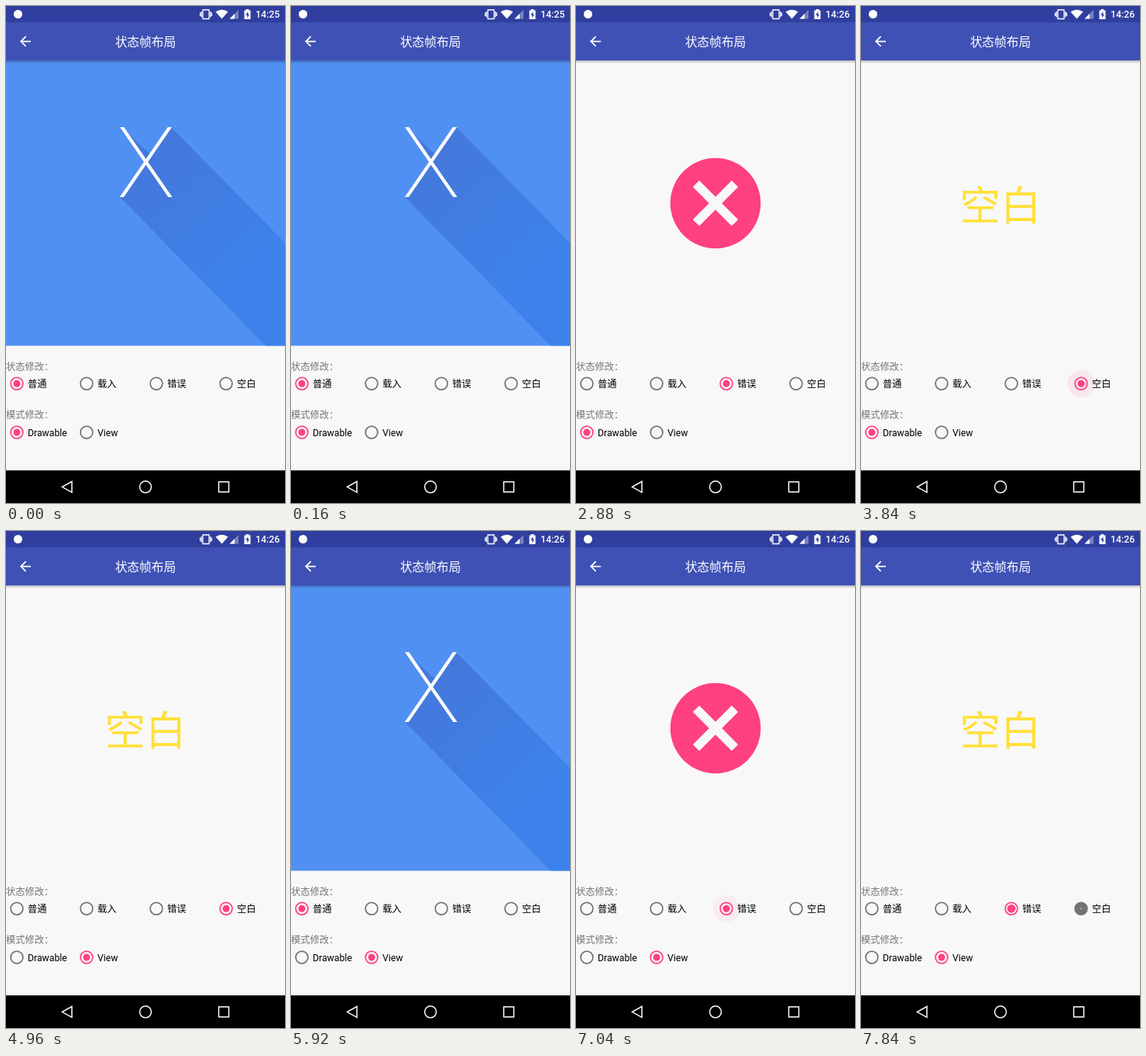
These frames come from a looping animation (360x640 px, 8 s). An HTML page:

```html
<!DOCTYPE html>
<html lang="zh-CN">
<head>
<meta charset="utf-8">
<title>状态帧布局</title>
<style>
  html, body { margin: 0; width: 100%; height: 100%; overflow: hidden; background: #f8f8f8; }
  svg { display: block; width: 100vw; height: 100vh; }
  text { font-family: Roboto, "Noto Sans CJK SC", "Noto Sans CJK", sans-serif; font-size: 12.25px; }
</style>
</head>
<body>
<svg id="stage" viewBox="0 0 360 640">
  <defs>
    <linearGradient id="long" gradientUnits="userSpaceOnUse" x1="180" y1="200" x2="320" y2="340">
      <stop offset="0" stop-color="#4478dc"/>
      <stop offset="1" stop-color="#3c82ea"/>
    </linearGradient>
    <linearGradient id="drop" x2="0" y2="1">
      <stop offset="0" stop-opacity=".26"/>
      <stop offset="1" stop-opacity="0"/>
    </linearGradient>
    <filter id="blur" x="-30%" y="-30%" width="160%" height="160%">
      <feGaussianBlur stdDeviation="1.3"/>
    </filter>
  </defs>
  <rect width="360" height="640" fill="#f8f8f8"/>

  <g id="normal">
    <rect y="70" width="360" height="367.5" fill="#5190f3"/>
    <path d="M150 157L187 192L213 156L360 305V437.5H335L147 246L180 201Z" fill="url(#long)"/>
    <path d="M147 156h5.2L214.5 246h-5.2ZM208.800 156h5.200L152 246h-5.200Z" fill="#fff"/>
  </g>
  <g id="load">
    <g id="disc">
      <circle cx="180" cy="255.300" r="17.500" opacity=".24" filter="url(#blur)"/>
      <circle cx="180" cy="254" r="17.500" fill="#fafafa"/>
    </g>
    <path id="arc" fill="none" stroke="#33aede" stroke-width="2.200"/>
  </g>
  <g id="error" transform="translate(180 254) scale(5.830)">
    <circle r="10" fill="#ff4081"/>
    <path d="M-4.295 -4.295L4.295 4.295M4.295 -4.295L-4.295 4.295" stroke="#f8f8f8" stroke-width="2"/>
  </g>
  <text id="empty" x="180" y="276" text-anchor="middle" fill="#ffe03a" style="font-size:52.5px">空白</text>

  <rect y="70" width="360" height="4" fill="url(#drop)"/>
  <rect width="360" height="70" fill="#3f51b5"/>
  <rect width="360" height="21" fill="#303f9f"/>
  <g fill="#fff">
    <circle cx="15.500" cy="10.500" r="5.500"/>
    <path d="M254 5h8v11.500h-8ZM252.300 7v7.500M250.600 8.500v4.500M263.700 7v7.500M265.400 8.500v4.500" fill="none" stroke="#fff" stroke-width="1.300"/>
    <path d="M270.500 7.500Q278.500 1.800 286.500 7.500L278.500 16.500Z"/>
    <path d="M300 5V16.500H288.500Z" opacity=".35"/>
    <path d="M295 10V16.500H288.500Z"/>
    <path d="M307.500 5.500h2.300V4h3.400v1.500h2.300V17h-8Z"/>
    <path d="M312.300 7L309.200 11.700h2V15.500L314 10.700h-1.700Z" fill="#303f9f"/>
    <text id="clock" x="322" y="15" font-weight="500"></text>
    <path transform="translate(14.500 35) scale(.875)" d="M20 11H7.830l5.590-5.590L12 4l-8 8 8 8 1.410-1.410L7.830 13H20z"/>
    <text x="180" y="51.500" text-anchor="middle" style="font-size:15.75px">状态帧布局</text>
  </g>

  <g fill="#757575">
    <text y="468.500">状态修改：</text>
    <text y="531">模式修改：</text>
  </g>
  <g id="radios"></g>

  <rect y="598" width="360" height="42"/>
  <g fill="none" stroke="#fff" stroke-width="1.500">
    <path d="M85 612.300V626.300L72.500 619.300ZM274.500 612.800h13v13h-13Z"/>
    <circle cx="180" cy="619.300" r="7.500"/>
  </g>
</svg>
<script>
const LOOP = 8000, PINK = '#ff4081', GREY = '#737373';
const NS = 'http://www.w3.org/2000/svg';
const $ = id => document.getElementById(id);
const clamp = x => Math.min(1, Math.max(0, x));
const ramp = (t, a, b) => clamp((t - a) / (b - a));
const easeOut = x => 1 - (1 - x) ** 2;

const views = ['normal', 'load', 'error', 'empty'];
// Each tap: when it is pressed, when the content follows, and the chosen option.
const states = [
  { press: -2000, show: -2000, pick: 0 },
  { press: 1020, show: 1110, pick: 1, spin: 1135 },
  { press: 2130, show: 2230, pick: 2 },
  { press: 3410, show: 3510, pick: 3 },
  { press: 5180, show: 5270, pick: 0 },
  { press: 5940, show: 6000, pick: 1, spin: 5950 },
  { press: 6540, show: 6640, pick: 2 },
  { press: 7100, show: 7190, pick: 3 },
  { press: 7760, show: 7860, pick: 2 }
];
const modes = [{ press: -2000, pick: 0 }, { press: 4300, pick: 1 }];

function add(parent, tag, attrs) {
  const el = parent.appendChild(document.createElementNS(NS, tag));
  set(el, attrs);
  return el;
}
function set(el, attrs) {
  for (const k in attrs) el.setAttribute(k, attrs[k]);
}

function makeRadio(label, i, y) {
  const g = add($('radios'), 'g', { transform: `translate(${14 + 90 * i} ${y})` });
  const ripple = add(g, 'circle', { fill: PINK });
  const ring = add(g, 'circle', { fill: 'none' });
  const dot = add(g, 'circle', { fill: PINK });
  add(g, 'text', { x: 14, y: 4.5 }).textContent = label;
  return { ripple, ring, dot };
}
const stateRadios = ['普通', '载入', '错误', '空白'].map((s, i) => makeRadio(s, i, 486.3));
const modeRadios = ['Drawable', 'View'].map((s, i) => makeRadio(s, i, 549));

// A ring from the hole out to the rim, with an optional dot inside.
function drawRadio(r, color, hole, dot) {
  const rim = 8.75;
  set(r.ring, { r: (rim + hole) / 2, 'stroke-width': rim - hole, stroke: color });
  set(r.dot, { r: dot, fill: color });
}

function updateRadios(radios, taps, t) {
  const n = taps.findLastIndex(e => t >= e.press);
  const now = taps[n], before = taps[n - 1], age = t - now.press;
  radios.forEach((r, i) => {
    if (i === now.pick) {
      const out = easeOut(ramp(age, 40, 140));
      if (age < 40) drawRadio(r, PINK, 7 * (1 - age / 40), 0);
      else drawRadio(r, PINK, 7, 7 - 2.5 * out);
    } else if (before && i === before.pick) {
      if (age < 72) drawRadio(r, GREY, 7, 4.5 + 2.5 * age / 72);
      else drawRadio(r, GREY, 7 * easeOut(ramp(age, 72, 230)), 0);
    } else drawRadio(r, GREY, 7, 0);
    const tap = taps.findLast(e => e.pick === i && t >= e.press);
    const since = tap ? t - tap.press : 9999;
    set(r.ripple, {
      r: 17.5 * easeOut(ramp(since, 85, 135)),
      opacity: 0.13 * (1 - ramp(since, 350, 650))
    });
  });
  return now.pick;
}

// cubic-bezier(.4, 0, .2, 1)
function fastOutSlowIn(x) {
  let lo = 0, hi = 1;
  for (let i = 0; i < 20; i++) {
    const u = (lo + hi) / 2, v = 1 - u;
    if (1.2 * v * v * u + 0.6 * v * u * u + u ** 3 < x) lo = u; else hi = u;
  }
  return 3 * (1 - lo) * lo * lo + lo ** 3;
}

function spinnerPath(ms) {
  const turns = Math.max(0, ms) / 1333, p = turns % 1, base = Math.floor(turns) * 0.75;
  const tail = base + 0.75 * fastOutSlowIn(ramp(p, 0.5, 1));
  const head = base + 0.05 + 0.75 * fastOutSlowIn(ramp(p, 0, 0.5));
  const spin = turns * (0.6 + 0.25);
  const point = f => {
    const a = (f + spin) * 2 * Math.PI;
    return `${180 + 7.66 * Math.cos(a)} ${254 + 7.66 * Math.sin(a)}`;
  };
  return `M${point(tail)}A7.66 7.66 0 ${head - tail > 0.5 ? 1 : 0} 1 ${point(head)}`;
}

function render(t) {
  const current = states.findLast(e => t >= e.show);
  views.forEach((id, i) => set($(id), { display: i === current.pick ? 'inline' : 'none' }));
  updateRadios(stateRadios, states, t);
  const mode = updateRadios(modeRadios, modes, t);
  if (current.spin) {
    set($('disc'), { display: mode ? 'inline' : 'none' });
    set($('arc'), { d: spinnerPath(t - current.spin) });
  }
  $('clock').textContent = t < 2230 ? '14:25' : '14:26';
}

const start = performance.now();
function tick() {
  render((performance.now() - start) % LOOP);
  requestAnimationFrame(tick);
}
tick();
</script>
</body>
</html>
```
